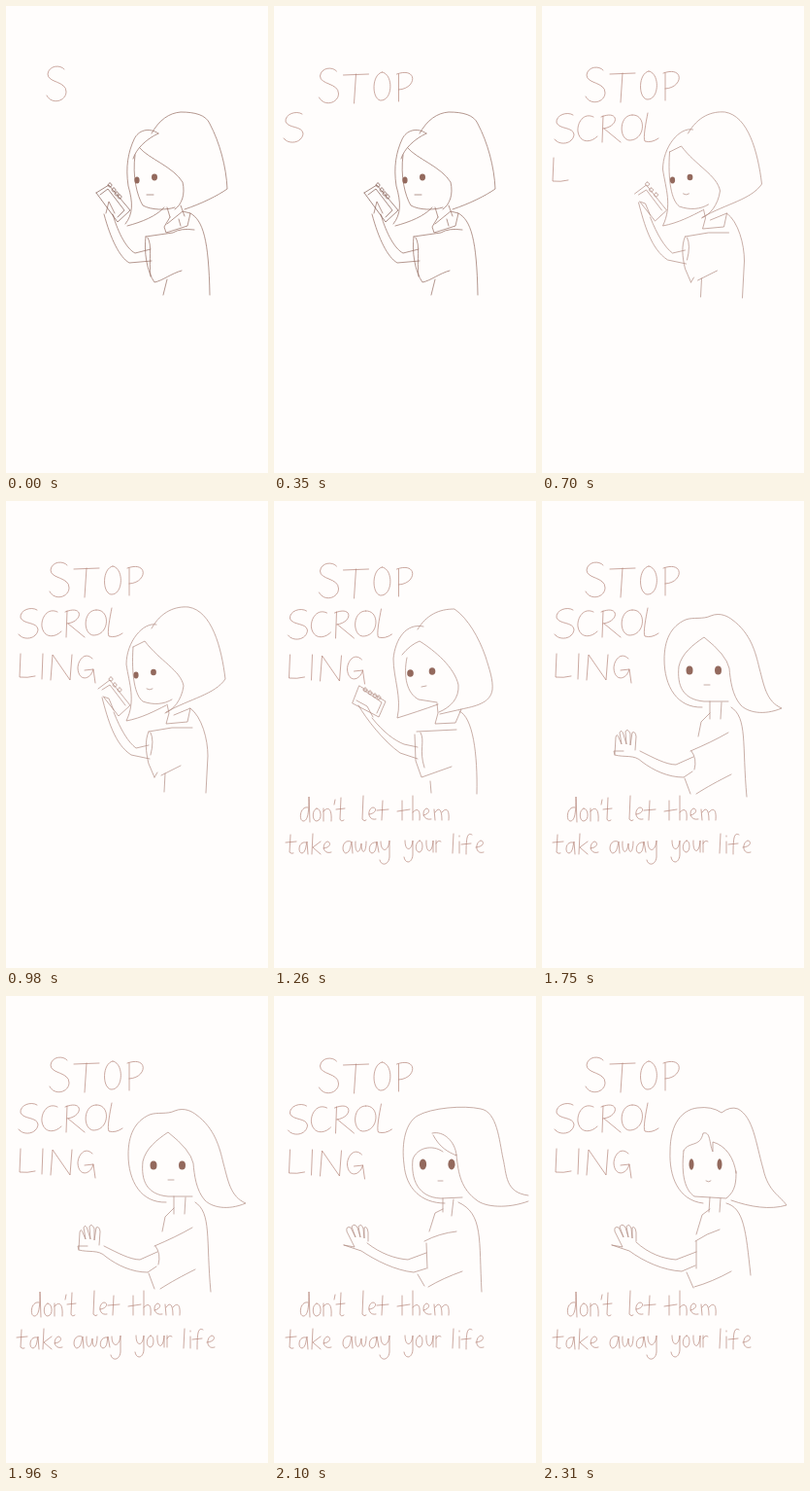
Write an HTML page that moves like this. It is 270x480 px and loops after 2380 ms.

```html
<!DOCTYPE html>
<html lang="en">
<head>
<meta charset="utf-8">
<title>Stop scrolling</title>
<style>
html, body { margin: 0; width: 100%; height: 100%; overflow: hidden; background: #fffdfc; }
svg { display: block; width: 100%; height: 100%; }
path { fill: none; stroke-width: .7; stroke-linecap: round; stroke-linejoin: round; }
</style>
</head>
<body>
<svg id="stage" viewBox="0 0 270 480" role="img" aria-label="STOP SCROLLING don't let them take away your life"></svg>
<script>
const STEP = 70, COUNT = 34;
const stage = document.getElementById('stage');
const INK = '#b18c82', DARK = '#946c61', PEN = '#b58479', EYE = '#93695d';

// Handwritten capitals, one entry per letter
const caps = [
  'M63 66C59 61 47 62 46 71C46 80 65 78 65 89C65 99 50 103 45 93',
  'M70 70L96 69M83 69L81 99',
  'M110 67C99 69 99 94 108 96C121 97 122 69 110 67',
  'M127 69L127 97M125 69C147 61 146 84 127 85',
  'M32 112C26 108 14 112 15 120C18 127 32 124 33 132C32 142 18 144 13 137',
  'M53 114C43 109 36 120 37 129C39 141 50 141 57 134',
  'M63 113L62 140M61 114C80 106 80 124 63 126M64 126L81 140',
  'M93 112C79 112 79 137 90 138C107 138 108 111 93 112',
  'M109 110C107 120 104 136 106 139Q113 141 120 136',
  'M15 157L14 181Q22 182 30 180',
  'M38 157L37 183',
  'M46 184L48 158L66 184L68 158',
  'M89 162C81 154 74 164 74 172C75 186 87 184 90 173L81 174M90 173L92 187'
];

const lines = [
  'M34 315C26 313 24 328 29 329C34 329 35 320 35 304L36 330' +
  'M43 316C38 317 38 329 43 329C49 328 48 316 43 316' +
  'M50 316L50 329M50 319C54 314 59 315 58 329M62 307L61 312' +
  'M68 305L67 327Q68 330 71 328M63 317L72 316' +
  'M91 303L90 327Q92 330 94 328M97 322C105 321 105 315 101 315C95 316 95 329 104 327' +
  'M111 308L110 328M105 318L117 317' +
  'M131 308L131 328M126 319L139 317M142 303L142 328M142 320C147 315 150 317 149 328' +
  'M153 323C161 321 159 316 156 316C151 318 152 329 161 327' +
  'M164 317L165 328M165 320C169 314 172 317 172 328M172 320C177 314 180 318 179 328',
  'M16 343L15 361Q17 363 19 362M11 351L22 350' +
  'M32 351C24 349 23 362 28 362C32 361 32 353 33 350L34 363' +
  'M39 342L38 363M47 350L39 356L47 363M50 357C59 356 57 350 54 350C48 352 49 364 58 361' +
  'M78 350C69 347 68 361 73 362C78 361 78 353 79 350L80 362' +
  'M83 350C82 364 88 363 89 352C89 364 94 363 94 350' +
  'M105 351C97 349 95 361 100 362C105 361 104 353 105 350L107 361' +
  'M109 350C109 362 117 361 118 349L118 366C117 375 109 375 108 369' +
  'M134 349C134 361 141 360 142 349L142 364C141 373 134 373 133 366' +
  'M149 349C144 351 144 361 149 361C153 360 153 349 149 349' +
  'M156 349C155 362 162 364 163 349L163 361M166 349L166 361M166 352Q168 348 171 350' +
  'M184 342L183 362M190 350L190 362M190 344L190 345' +
  'M203 343C198 340 197 346 197 363M192 353L202 352' +
  'M207 356C217 355 215 349 212 349C206 351 206 364 215 361'
];

// A pose: line work, heavier line work, eyes [x, y, rx, ry]
const reading = {
  ink: DARK,
  d: 'M157 131C147 124 136 128 132 137C126 150 123 165 126 185C131 202 131 214 123 224' +
     'M150 131C158 117 168 110 180 109C195 109 206 112 210 121C220 140 227 165 228 188' +
     'C218 195 202 203 184 209M157 131C144 137 134 147 131 157' +
     'M125 226C140 222 155 216 163 207M133 153C130 175 135 195 141 205C150 210 165 210 174 207' +
     'M138 146C147 157 172 165 182 181C185 194 181 204 174 209M145 194L152 194' +
     'M166 207L169 217M180 205L184 216M169 217L163 227L165 233L187 226L190 213L182 211L166 224M178 219L180 226' +
     'M190 213C203 220 209 240 210 297M144 237L172 233Q180 228 194 230' +
     'M144 237C142 252 145 273 153 284C162 282 170 275 181 272M146 238C151 246 147 260 149 278M166 281L162 297' +
     'M110 214C116 235 125 250 133 254L149 250M101 214C108 240 117 258 127 264L150 262' +
     'M103 213L106 201L112 213',
  bold: 'M93 192L106 184L128 210L115 222L93 192M97 194L105 188L122 210L115 217M107 182a2 2 0 1 0 .1 0' +
     'M111 187a2 2 0 1 0 .1 0M114 191a2 2 0 1 0 .1 0M117 194a2 2 0 1 0 .1 0',
  eyes: [[135, 179, 2.6, 3.6], [153, 176, 3, 3.4]]
};
const readingSoft = {
  ink: INK,
  d: 'M155 127C141 124 124 145 124 168C127 188 134 205 124 226C140 223 153 216 165 210' +
     'M150 131C160 113 175 108 188 109C212 113 222 150 226 183C215 199 190 203 165 217' +
     'M131 150C129 180 133 200 141 206C152 210 163 209 171 204M131 150L143 144C158 164 180 174 183 190C181 205 172 215 164 218' +
     'M145 193Q148 195 151 193M166 209L168 218L165 229L187 227L190 213L173 220' +
     'M190 213C202 222 208 245 208 262L206 300M147 237L171 233L192 233' +
     'M147 237C143 246 144 258 147 270L153 284M149 238Q153 246 149 261M153 284L156 279M160 282L180 272M164 280L163 299' +
     'M111 217C118 235 126 248 134 254L147 251M99 202C105 225 112 250 129 261L148 265' +
     'M95 193L107 184L128 210L116 221L101 202M99 194L107 189L123 210M100 201L106 203L111 215' +
     'M108 181a2 2 0 1 0 .1 0M112 187a2 2 0 1 0 .1 0M117 192a2 2 0 1 0 .1 0',
  eyes: [[134, 179, 2.6, 3.4], [152, 176, 2.9, 3.2]]
};
const lifting = {
  ink: INK,
  d: 'M154 129C136 125 125 142 123 162C123 182 132 202 127 223C140 219 155 214 169 209' +
     'M148 132C157 117 170 111 186 111C200 121 211 140 218 160C222 173 226 184 225 194C223 208 207 211 193 214' +
     'M137 161C133 180 137 198 149 204L168 207M132 158Q140 148 150 144C166 154 186 171 190 189C191 203 182 212 170 217' +
     'M152 191L157 190M168 208L169 218L166 229L187 228L193 214L171 219' +
     'M191 216C205 222 210 260 209 301M147 237L188 235M145 240L146 267L152 284L183 273M151 238C156 247 149 256 155 274M161 288L162 300' +
     'M101 223C113 238 124 246 134 250L148 253M87 210C95 224 113 247 130 259L148 265' +
     'M88 190L115 206L108 222L81 208ZM92 194L111 207L106 218M85 205L96 211L102 222' +
     'M94 192a2 2 0 1 0 .1 0M99 195a2 2 0 1 0 .1 0M104 198a2 2 0 1 0 .1 0M108 200a2 2 0 1 0 .1 0',
  eyes: [[140.5, 177, 3.3, 3.8], [163, 175, 3.3, 3.8]]
};
const facing = tip => ({
  ink: INK,
  d: 'M165 212C139 213 126 190 126 163C126 144 132 129 148 122C156 119 166 122 174 118C184 114 192 119 196 122' +
     `C215 136 220 155 224 172C229 190 ${tip - 16} 206 ${tip} 213C228 221 212 217 205 210C196 200 194 184 193 172` +
     'Q190 158 167 140C155 148 144 157 141 170C139 190 145 204 167 206L192 206M167 189L173 189' +
     'M173 206L173 224M185 207L184 224M173 218L164 227L161 242M195 212C212 223 206 250 211 304' +
     'M153 257C167 251 180 245 192 238M154 257Q160 265 157 276M147 285L153 301M159 301C170 294 181 288 195 281' +
     'M101 257C115 264 128 271 138 271L156 263M75 261C85 264 95 260 103 268C115 277 130 284 146 284L155 278' +
     'M75 260L76 243Q77 238 79 243L82 250L80 238Q82 234 84 240L87 250L86 237Q88 233 91 239L91 251L93 238Q96 236 97 242L96 256' +
     'M75 261L74 257L84 257',
  eyes: [[152, 174, 3.5, 4.5], [181.5, 174, 3.5, 4.5]]
});
const wave = 'M72 256L83 258L75 242Q74 236 79 238L84 248L80 237Q83 233 86 238L89 248L87 237Q90 233 92 239L93 249L93 238Q96 236 97 243L97 252';
const windy = {
  ink: INK,
  d: 'M176 213C152 213 136 198 134 173C131 150 136 130 148 123C162 115 195 112 213 116C230 119 232 148 236 167' +
     'C240 184 238 202 262 205M262 211C240 219 218 217 209 210C193 198 190 184 188 163' +
     'M163 141C175 138 187 150 188 164C179 160 171 156 164 143M174 160C163 152 147 156 143 168C141 188 148 207 172 208L194 207' +
     'M169 190L174 190M174 208L174 222M185 209L183 226M174 219L166 223L160 242' +
     'M190 212C216 224 211 250 214 304M155 252Q170 244 188 242M157 254L158 280M148 286L155 298M159 299Q174 290 194 283' +
     'M96 254C110 265 125 270 138 271L157 264M72 256L90 262C105 272 125 282 144 284L157 280' + wave,
  eyes: [[153.5, 173, 3.6, 5.6], [183, 173, 3.6, 5.4]]
};
const calm = {
  ink: INK,
  d: 'M166 213C140 210 131 185 132 160C132 130 145 117 160 115Q175 113 185 120Q194 113 202 116C218 125 220 150 228 178' +
     'C233 201 246 206 252 215C235 220 215 217 195 210M146 159C143 185 148 200 157 206L190 208C200 200 200 190 200 180' +
     'M146 159C151 149 163 156 166 141C174 139 172 151 176 160L176 150C190 154 198 167 200 182' +
     'M169 190Q172 192 174 190M173 207L172 222M184 208L183 222M173 219L165 225L159 245' +
     'M190 213C208 218 210 240 215 287M158 252Q170 244 183 240M159 252L159 280M149 284L156 300M157 299Q175 294 195 283' +
     'M97 253C110 265 125 270 138 271L159 263M72 256L90 262C105 273 125 282 144 283L158 277' + wave,
  eyes: [[154, 173, 2.5, 5.8], [183, 173, 2.5, 5.8]]
};

const stroke = (d, ink, x = 0, y = 0) =>
  `<path d="${d}" stroke="${ink}" transform="translate(${x} ${y})"/>`;

function drawGirl(p, x) {
  const eyes = p.eyes.map(([cx, cy, rx, ry]) =>
    `<ellipse cx="${cx}" cy="${cy}" rx="${rx}" ry="${ry}" fill="${EYE}"/>`).join('');
  return `<g transform="translate(${x} 0)">${stroke(p.d, p.ink)}${p.bold ? stroke(p.bold, '#805a4f') : ''}${eyes}</g>`;
}

function pose(beat) {
  if (beat < 9) return beat % 3 ? readingSoft : reading;
  if (beat < 12) return lifting;
  if (beat < 13) return facing(238);
  if (beat < 15) return facing(247);
  return beat < 17 ? windy : calm;
}

function draw(i) {
  const beat = Math.floor((i + 1) / 2), wobble = beat % 3 === 0;
  const shown = i < 5 ? Math.min(i + 1, 4) : Math.min(i, caps.length);
  const fresh = i === 4 || i > caps.length ? -1 : shown - 1;
  let out = drawGirl(pose(beat), beat < 9 && beat % 3 === 2 ? .5 : 0);
  caps.slice(0, shown).forEach((d, n) => {
    const isNew = n === fresh;
    out += stroke(d, PEN, isNew ? -3 : wobble ? 1.5 : 0, isNew ? -1 : wobble ? 1 : 0);
  });
  lines.forEach((d, n) => {
    const start = 15 + n;
    if (i >= start) out += stroke(d, PEN, i === start ? -10 : wobble ? 1 : 0);
  });
  stage.innerHTML = out;
}

let last = -1;
const begin = performance.now();
function tick(now) {
  const i = Math.floor(Math.max(0, now - begin) / STEP) % COUNT;
  if (i !== last) draw(last = i);
  requestAnimationFrame(tick);
}
draw(0);
requestAnimationFrame(tick);
</script>
</body>
</html>
```
